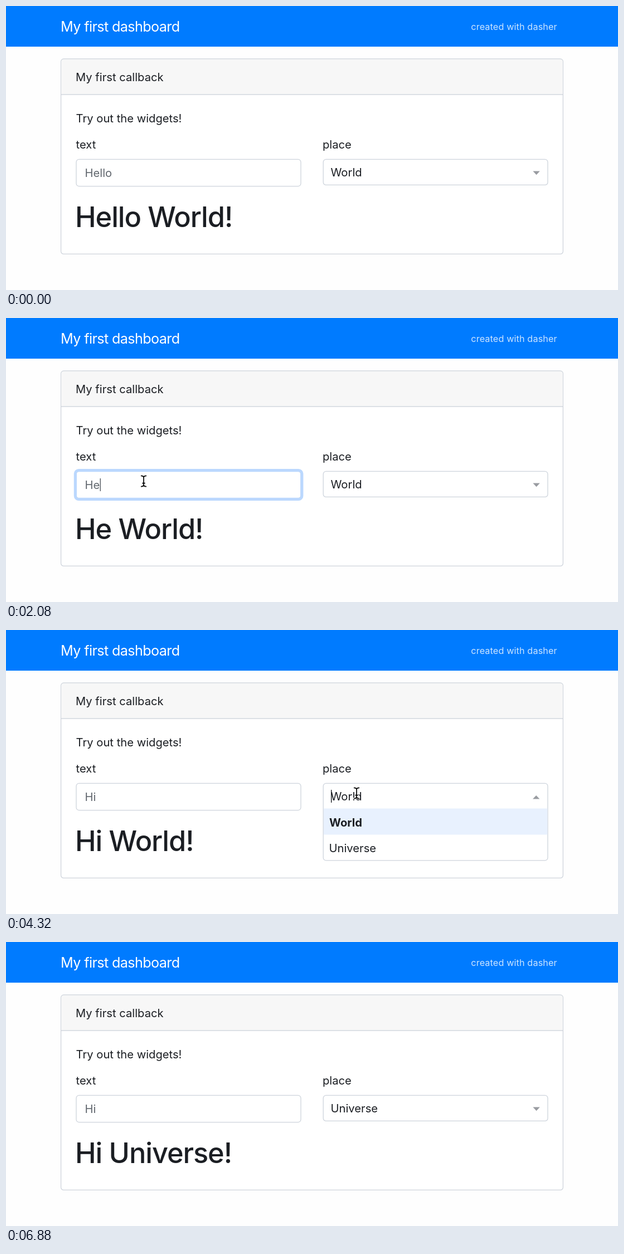
Write an HTML page that moves like this. It is 1098 px wide and 510 px high and loops after 7880 ms.

```html
<!DOCTYPE html>
<html lang="en">
<head>
<meta charset="utf-8">
<title>My first dashboard</title>
<style>
  html, body { margin: 0; width: 100%; height: 100%; overflow: hidden; background: #fefefe; }
  svg { display: block; width: 100%; height: 100%; }
  text { font: 20.2px Inter, "Open Sans", sans-serif; font-optical-sizing: none; fill: #1b1e23; white-space: pre; }
  .brand { font-size: 25.2px; letter-spacing: -.025em; fill: #fff; }
  .credit { font-size: 16.2px; letter-spacing: .008em; fill: #cce5ff; }
  .title { font-size: 50.5px; font-weight: 500; letter-spacing: -.021em; }
  .typed { fill: #60666d; }
  .box { fill: #fff; stroke: #ced4dc; stroke-width: 1.3; }
  .bold { font-weight: 700; }
</style>
</head>
<body>
<svg viewBox="0 0 1098 510">
  <rect width="1098" height="510" fill="#fefefe"/>
  <rect width="1098" height="73" fill="#007bff"/>
  <text class="brand" x="98" y="46">My first dashboard</text>
  <text class="credit" x="834.3" y="43">created with dasher</text>

  <rect class="box" x="98.6" y="95" width="900.8" height="350.4" rx="5"/>
  <path d="M99.3 158.5V100q0-4.3 4.3-4.3H994.4q4.3 0 4.3 4.3V158.5Z" fill="#f7f7f7"/>
  <path d="M99 159H999" stroke="#d2d7de" stroke-width="1.3"/>
  <text x="125" y="134.6">My first callback</text>
  <text x="125.5" y="209">Try out the widgets!</text>
  <text x="125.5" y="256">text</text>
  <text x="568" y="256">place</text>

  <rect class="box" x="126" y="275.4" width="403" height="48.2" rx="5"/>
  <rect id="ring" x="124.4" y="273.6" width="406.4" height="51.8" rx="6" fill="none" stroke="#bbd8fe" stroke-width="5.2"/>
  <text id="typed" class="typed" x="141.5" y="307">Hello</text>
  <rect id="caret" y="288" width="1.4" height="23" fill="#555b62"/>
  <text id="title" class="title" x="124" y="397">Hello World!</text>

  <rect id="glow" x="565" y="271.2" width="411" height="54" rx="8" fill="#e4f1ff"/>
  <rect id="select" class="box" x="569.2" y="275.4" width="402.8" height="46" rx="5"/>
  <g id="menu">
    <rect class="box" x="569.2" y="275.4" width="402.8" height="138.4" rx="5"/>
    <rect id="hover" x="569.9" width="401.4" height="47" fill="#e8f1fe"/>
    <text class="bold" x="580" y="353">World</text>
    <text x="579.5" y="399">Universe</text>
    <rect id="caret2" x="583" y="287" width="1.4" height="23" fill="#1b1e23"/>
  </g>
  <text id="place" x="582.5" y="306">World</text>
  <path id="arrow" fill="#999ca1"/>

  <g id="pointer">
    <path d="M1.5 3.5V20.5L5.3 17L8 23L11 21.6L8.4 16H13.5Z" fill="#000" opacity=".12"/>
    <path d="M0 0V18L4 14.2L6.9 20.8L10.2 19.4L7.4 13H12.6Z" fill="#000" stroke="#fff" stroke-width="1.4" transform="translate(.3 1)"/>
  </g>
  <g id="beam" fill="none" stroke-linecap="round">
    <path id="beamEdge" stroke="#fff" stroke-width="3.6"/>
    <path id="beamLine" stroke="#000" stroke-width="1.7"/>
  </g>
</svg>
<script>
const LOOP = 7880, STEP = 40;
const FOCUS = 1040, BLUR = 3840, PICK = 4880, LEAVE = 6880;

const $ = id => document.getElementById(id);
const show = (id, on) => $(id).setAttribute("visibility", on ? "visible" : "hidden");
const set = (id, name, value) => $(id).setAttribute(name, value);
const clamp = v => Math.max(0, Math.min(1, v));
const within = (t, a, b) => t >= a && t < b;

// [time, value], held until the next entry
const typing = [[0, "Hello"], [1800, "Hell"], [1960, "Hel"], [2080, "He"], [2360, "H"], [2840, "Hi"]];

// [time, x, y] of the mouse
const route = [
  [200, 470, 488], [240, 392, 412], [280, 327, 347], [320, 300, 320],
  [520, 299, 319], [800, 248, 279], [920, 247, 291], [1000, 247, 293],
  [3240, 247, 293], [3280, 252, 293], [3360, 320, 272], [3480, 450, 255],
  [3600, 560, 266], [3760, 629, 293], [4320, 629, 293], [4440, 630, 325],
  [4640, 627, 380], [4760, 625, 385], [5920, 625, 385], [5960, 622, 406], [6000, 617, 445]
];

const beamPath = "M-4.3-9.6Q-.9-9.6 0-7.4Q.9-9.6 4.3-9.6M0-7.4V7.4M-4.3 9.6Q-.9 9.6 0 7.4Q.9 9.6 4.3 9.6M-2 3.6H2";
set("beamEdge", "d", beamPath);
set("beamLine", "d", beamPath);

function mouseAt(t) {
  const i = Math.max(1, route.findIndex(p => p[0] > t));
  if (t >= route.at(-1)[0]) return route.at(-1).slice(1);
  const [a, b] = [route[i - 1], route[i]];
  const k = clamp((t - a[0]) / (b[0] - a[0]));
  return [a[1] + (b[1] - a[1]) * k, a[2] + (b[2] - a[2]) * k];
}

function drawMouse(t) {
  const [x, y] = mouseAt(t);
  const seen = within(t, 200, 6040);
  const plain = y > 410 || (x > 533 && t < BLUR) || t >= 4400;
  show("pointer", seen && plain);
  show("beam", seen && !plain);
  const move = `translate(${x} ${y})`;
  set("pointer", "transform", move);
  set("beam", "transform", move);
}

function draw(t) {
  const word = typing.findLast(e => t >= e[0])[1];
  const place = t < PICK ? "World" : "Universe";
  $("typed").textContent = word;
  $("title").textContent = `${word} ${place}!`;
  $("place").textContent = place;

  // the focus ring fades in and out over 150 ms
  set("ring", "opacity", clamp((t - FOCUS) / 150) - clamp((t - BLUR) / 150));
  set("caret", "x", 141.8 + $("typed").getComputedTextLength());
  show("caret", within(t, FOCUS, BLUR) && !within(t, 1520, 1800) && !within(t, 2520, 2840));

  const open = within(t, BLUR, PICK);
  const lit = within(t, PICK, LEAVE);
  show("menu", open);
  show("caret2", open && t < 4360);
  set("hover", "y", t < 4600 ? 320.5 : 366.5);
  show("glow", lit);
  show("select", !open);
  $("select").style.stroke = lit ? "#0a7cf5" : "";
  set("arrow", "d", open ? "M945 303.4H957.4L951.2 297Z" : "M945.4 296.6H957.8L951.6 303.2Z");
  drawMouse(t);
}

const start = performance.now();
function tick() {
  const t = (performance.now() - start) % LOOP;
  draw(Math.floor(t / STEP) * STEP);
  requestAnimationFrame(tick);
}
tick();
</script>
</body>
</html>
```
